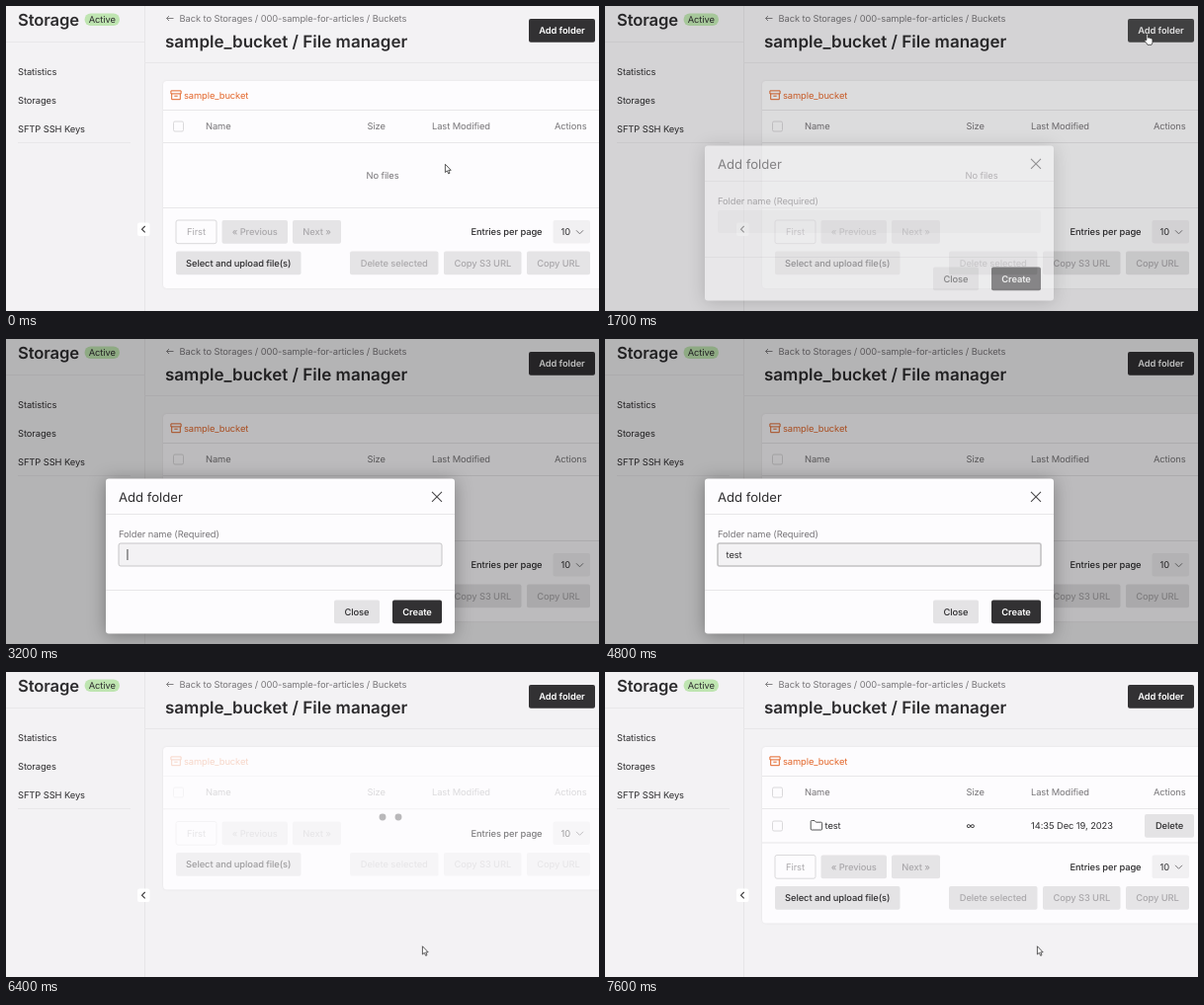
An HTML page for the animation above (8500 ms loop, 600 by 309 pixels).

```html
<!DOCTYPE html>
<html lang="en">
<head>
<meta charset="utf-8">
<title>File manager</title>
<style>
  html, body { margin: 0; width: 100%; height: 100%; overflow: hidden; background: #f3f2f4; }
  svg { display: block; width: 600px; height: 309px; font-family: Inter, "Open Sans", sans-serif; }
  text { font-size: 9.33px; letter-spacing: -.008em; fill: #2d2c2e; white-space: pre; text-rendering: geometricPrecision; }
  .brand { font-size: 16.6px; font-weight: 600; }
  .big { font-size: 17px; font-weight: 600; letter-spacing: 0; }
  .title { font-size: 13.1px; letter-spacing: 0; }
  .soft { fill: #777578; }
  .off { fill: #aaa8ab; }
  .orange { fill: #e3672b; }
  .bold { font-weight: 600; }
  .mid { font-weight: 500; }
  .white { fill: #fff; }
  #card { filter: drop-shadow(0 0 1px #0001); }
  #panel { filter: drop-shadow(0 2px 9px #0005); }
  .loading .dim { opacity: .25; }
  .loading .half { opacity: .45; }
  .loading .most { opacity: .6; }
</style>
</head>
<body>
<svg id="stage" viewBox="0 0 600 309"></svg>
<script>
const LOOP = 8500, STEP = 100;
const stage = document.getElementById('stage');

// Markup helpers
const attrs = o => Object.entries(o).map(([k, v]) => ` ${k}="${v}"`).join('');
const rect = (x, y, w, h, fill, o = {}) => `<rect${attrs({ x, y, width: w, height: h, fill, ...o })}/>`;
const text = (x, y, s, cls = '', o = {}) => `<text${attrs({ x, y, class: cls, ...o })}>${s}</text>`;
const path = (d, stroke, o = {}) => `<path${attrs({ d, stroke, fill: 'none', ...o })}/>`;
const group = (inner, o = {}) => `<g${attrs(o)}>${inner}</g>`;
const rule = (x, y, w) => rect(x, y, w, 1, '#e8e7e9');
const button = (x, y, w, label, fill, cls, o = {}) =>
  rect(x, y, w, 23.7, fill, { rx: 2, ...o }) +
  text(x + w / 2, y + 15.2, label, cls, { 'text-anchor': 'middle' });
const checkbox = y => rect(169.5, y, 10, 10, '#fdfcfe', { rx: 1.5, stroke: '#dad9db' });

const sidebar =
  text(12, 19.7, 'Storage', 'brand') +
  rect(79.5, 7.5, 35.5, 12.5, '#bfe5b1', { rx: 6.2 }) +
  text(97.3, 17.2, 'Active', '', { 'text-anchor': 'middle', fill: '#333' }) +
  rule(0, 36, 140) +
  text(12, 70.2, 'Statistics') +
  text(12, 99.2, 'Storages') +
  text(12, 127.8, 'SFTP SSH Keys') +
  rule(12, 138, 114) + rect(140, 0, 1, 309, '#e6e5e7');

const header =
  path('M169.5 12.5H162.5M165 10L162.5 12.5L165 15', '#777578', { 'stroke-width': .9 }) +
  text(175.5, 15.5, 'Back to Storages / 000-sample-for-articles / Buckets', 'soft') +
  text(161, 42, 'sample_bucket / File manager', 'big') +
  rule(140, 57, 460) +
  button(529, 13, 67, 'Add folder', '#323133', 'bold white', { id: 'add' });

const cardTop =
  group(
    path('M166.9 85.9H177.1V88.9H166.9ZM167.7 88.9V94.7H176.3V88.9M170.3 91.2H173.7', '#e3672b') +
    text(180, 93.8, 'sample_bucket', 'orange') +
    rule(159, 105, 441) +
    checkbox(117) + text(202, 125.3, 'Name', 'soft') + text(365.5, 125.3, 'Size', 'soft') +
    text(431, 125.3, 'Last Modified', 'soft') + text(555, 125.3, 'Actions', 'soft') +
    rule(159, 138, 441), { class: 'dim' });

const empty = text(381, 174.7, 'No files', 'soft', { 'text-anchor': 'middle' });
const fileRow =
  checkbox(151) +
  path('M208.2 151.5Q208.2 150.5 209.2 150.5H212L213.5 152.2H218.6Q219.6 152.2 219.6 153.2V159Q219.6 160 218.6 160H209.2Q208.2 160 208.2 159Z', '#454446', { 'stroke-width': .9 }) +
  text(222.5, 159.2, 'test') + text(365.5, 159.2, '∞') +
  text(431, 159.2, '14:35 Dec 19, 2023') +
  button(546, 144, 50, 'Delete', '#e4e3e5', 'mid');

// Positions relative to the line that closes the table
const gray = '#e5e4e6';
const footer =
  group(rule(159, 0, 441) +
    button(172, 13, 41, 'First', '#fdfcfe', 'off', { stroke: '#dad9db' }) +
    button(218.5, 13, 66.5, '« Previous', gray, 'off mid') +
    button(290, 13, 49, 'Next »', gray, 'off mid'), { class: 'dim' }) +
  text(470.5, 28.3, 'Entries per page', 'mid most') +
  group(rect(553.5, 13, 37.5, 23.5, '#f1f0f2', { rx: 2 }) + text(561.5, 28.3, '10') +
    path('M577 23.3L580.5 26.8L584 23.3', '#777578'), { class: 'half' }) +
  group(button(172, 44.5, 126.5, 'Select and upload file(s)', '#e4e3e5', 'mid'), { class: 'half' }) +
  group(button(348, 44.5, 89.5, 'Delete selected', gray, 'off mid') +
    button(443, 44.5, 78.5, 'Copy S3 URL', gray, 'off mid') +
    button(527, 44.5, 64, 'Copy URL', gray, 'off mid'), { class: 'dim' });

const toggle =
  rect(133, 219.5, 12.5, 13.5, '#fff', { rx: 2 }) +
  path('M140.7 223L137.5 226.2L140.7 229.4', '#3a393b', { 'stroke-width': 1.1 });

const modal =
  rect(101, 141.5, 353, 157, '#fdfcfe', { rx: 3, id: 'panel' }) +
  text(114, 164.5, 'Add folder', 'title') +
  path('M431 154.8L441 164.8M441 154.8L431 164.8', '#4a494b', { 'stroke-width': 1.1 }) +
  rule(101, 177, 353) +
  text(114, 201.2, 'Folder name (Required)', 'soft') +
  rect(114, 207, 327, 23, '#f3f2f4', { rx: 2, id: 'field' }) +
  text(122.5, 222, '', '', { id: 'typed' }) +
  rect(0, 213, .9, 11, '#333', { id: 'caret' }) +
  rule(101, 254, 353) +
  button(332, 264.5, 46, 'Close', '#e4e3e5', 'mid') +
  button(391, 264.5, 50, 'Create', '#323133', 'bold white', { id: 'create' });

const pointers =
  group(path('M.4 .3V8.6L2.3 6.9L3.7 9.9L5 9.3L3.7 6.4H6.2Z', '#333', { fill: '#fff', 'stroke-width': .8 }), { id: 'arrow' }) +
  group(path('M1.3 6.6V1.1Q1.3 .2 2.1 .2T2.9 1.1V4.1Q4.3 3.6 4.6 4.5Q5.8 4 6.1 4.9Q7.4 4.7 7.4 6V8.3Q7.4 9.7 6.4 11.2H2.4Q1.4 9.4 -.5 7.4Q-.6 6 1.3 6.6Z', '#333', { fill: '#fff', 'stroke-width': .8 }), { id: 'hand' }) +
  group(path('M-1.5 -5H1.5M0 -5V5M-1.5 5H1.5', '#444', { 'stroke-width': .8 }), { id: 'beam' });

stage.innerHTML =
  rect(0, 0, 600, 309, '#f3f2f4') + sidebar + header +
  rect(159, 76, 445, 210, '#fdfcfe', { rx: 4, id: 'card' }) +
  group(cardTop + group(empty, { id: 'empty' }) + group(fileRow, { id: 'row' }) +
    group(footer, { id: 'footer' }), { id: 'list' }) +
  group([365, 381, 397].map(x => `<circle cx="${x}" cy="147" fill="#b9b8ba"/>`).join(''), { id: 'dots' }) +
  toggle +
  rect(0, 0, 600, 309, '#000', { id: 'shade' }) +
  group(modal, { id: 'modal' }) + group(pointers, { id: 'pointer' });

const $ = Object.fromEntries([...stage.querySelectorAll('[id]')].map(e => [e.id, e]));
const show = (el, on) => el.setAttribute('display', on ? 'inline' : 'none');
const set = (el, o) => { for (const k in o) el.setAttribute(k, o[k]); };
const clamp = v => Math.max(0, Math.min(1, v));
const ramp = (t, a, b) => clamp((t - a) / (b - a));

// Pointer track: time, x, y
const track = [
  [0, 444, 160], [300, 446, 156], [900, 489, 100], [1300, 547, 29], [1800, 546.5, 28],
  [2000, 532, 42], [2400, 400, 138], [3000, 262, 218], [5200, 262, 218],
  [5900, 420, 279], [6200, 421, 277.5], [7000, 421, 277.5], [7400, 436, 277], [7600, 437, 277.5], [LOOP, 437, 277.5]
];
function pointerAt(t) {
  const i = Math.max(1, track.findIndex(p => p[0] >= t));
  const [a, x0, y0] = track[i - 1], [b, x1, y1] = track[i];
  const k = ramp(t, a, b), e = k * k * (3 - 2 * k);
  return [x0 + (x1 - x0) * e, y0 + (y1 - y0) * e];
}
const inside = (x, y, l, top, r, b) => x >= l && x <= r && y >= top && y <= b;

function render(t) {
  const loading = t >= 6300 && t < 7000, done = t >= 7000;
  const open = t < 4000 ? ramp(t, 1600, 1800) : 1 - ramp(t, 6100, 6300);

  // File list
  const end = loading ? 138.5 : done ? 172.5 : 204;
  $.list.setAttribute('class', loading ? 'loading' : '');
  show($.empty, !loading && !done);
  show($.row, done);
  set($.footer, { transform: `translate(0 ${end})` });
  set($.card, { height: end + 82 - 76 });
  show($.dots, loading);
  [...$.dots.children].forEach((dot, i) => {
    const angle = 2 * Math.PI * ((t - 6400) / 900 - i / 3);
    set(dot, { r: 2.3 * (1 - Math.cos(angle)) });
  });

  // Dialog
  show($.shade, open > 0);
  show($.modal, open > 0);
  set($.shade, { opacity: .26 * open });
  set($.modal, { opacity: open });
  const focus = t >= 3200 && t < 6100;
  const ring = ramp(t, 3100, 3500);
  set($.field, { stroke: focus ? '#c3c2c4' : 'none', 'stroke-width': .7 + ring * .9 });
  const count = [3700, 3900, 4100, 4300].filter(k => t >= k).length;
  $.typed.textContent = 'test'.slice(0, count);
  set($.caret, { x: [122.5, 126.6, 132, 136.4, 139.4][count] });
  show($.caret, focus && t < 4800);

  // Pointer
  const [x, y] = pointerAt(t);
  const overAdd = t < 1900 && inside(x, y, 529, 13, 596, 37);
  const onAdd = overAdd && t < 1800;
  const onCreate = t > 5000 && t < 6300 && inside(x, y, 391, 264, 441, 288);
  const onField = t > 2400 && t < 6000 && inside(x, y, 114, 207, 441, 230);
  set($.add, { fill: overAdd ? '#4a494b' : '#323133' });
  set($.create, { fill: onCreate ? '#4a494b' : '#323133' });
  show($.hand, onAdd || onCreate);
  show($.beam, onField);
  show($.arrow, !onAdd && !onCreate && !onField);
  show($.pointer, t < 3100 || t >= 5300);
  set($.pointer, { transform: `translate(${x} ${y})` });
}

const start = performance.now();
function tick() {
  const t = (performance.now() - start) % LOOP;
  render(Math.floor(t / STEP) * STEP);
  requestAnimationFrame(tick);
}
tick();
</script>
</body>
</html>
```
